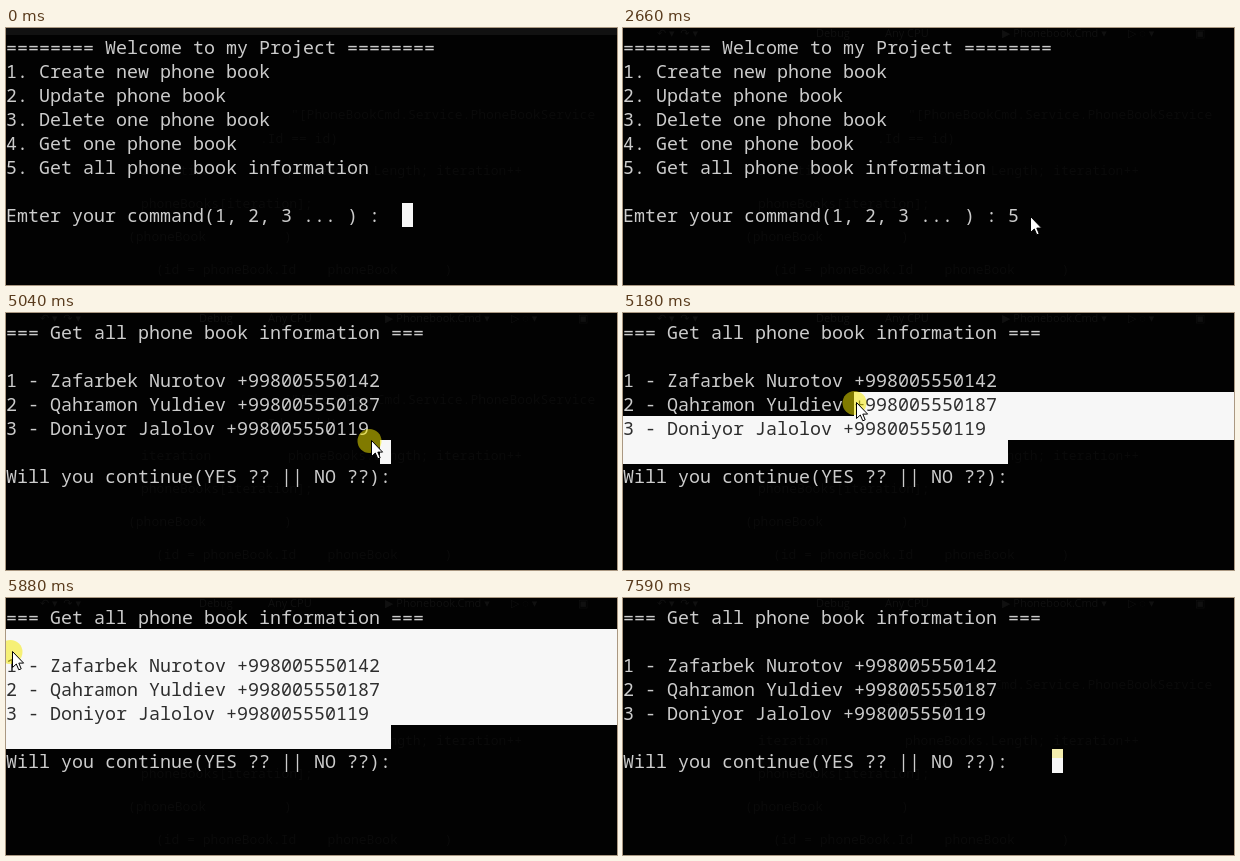
An HTML page for the animation above (8 s loop, 611 by 257 pixels).

```html
<!DOCTYPE html>
<html lang="en">
<head>
<meta charset="utf-8">
<title>Phone book console</title>
<style>
  html, body { margin: 0; width: 100%; height: 100%; overflow: hidden; background: #020202; }
  #stage { position: absolute; left: 0; top: 0; width: 611px; height: 257px; overflow: hidden; background: #020202; isolation: isolate; }
  pre {
    position: absolute; left: 0; top: 7px; margin: 0;
    font: 18.333px/24px "Noto Sans Mono", "DejaVu Sans Mono", monospace;
    font-variant-ligatures: none; color: #ccc;
  }
  svg { position: absolute; left: 0; top: 0; }
  #marks { mix-blend-mode: difference; }
  #ghost text { font: 13px "Noto Sans Mono", monospace; fill: #fff; fill-opacity: .035; white-space: pre; }
  #ghost #bar text { font: 11px "Open Sans", sans-serif; fill-opacity: .06; }
</style>
</head>
<body>
<div id="stage">
  <pre id="menu">======== Welcome to my Project ========
1. Create new phone book
2. Update phone book
3. Delete one phone book
4. Get one phone book
5. Get all phone book information

Emter your command(1, 2, 3 ... ) : <span id="typed">5</span></pre>
  <pre id="list">=== Get all phone book information ===

1 - Zafarbek Nurotov +998005550142
2 - Qahramon Yuldiev +998005550187
3 - Doniyor Jalolov +998005550119

Will you continue(YES ?? || NO ??):</pre>

  <svg id="marks" width="611" height="257">
    <path id="sel" fill="#f9f9f9"/>
  </svg>

  <svg id="ghost" width="611" height="257">
    <rect id="strip" width="611" height="7" fill="#fff" fill-opacity=".06"/>
    <g id="bar">
      <text x="34" y="9">↶ ▾  ↷ ▾</text>
      <text x="193" y="9">Debug</text>
      <text x="262" y="9">Any CPU</text>
      <text x="379" y="9">▶ Phonebook.Cmd ▾</text>
      <text x="505" y="9">▷ ◌ ▾</text>
      <text x="572" y="9">▣</text>
    </g>
    <text x="285" y="91">"[PhoneBookCmd.Service.PhoneBookService</text>
    <text x="254" y="115">.Id == id)</text>
    <text x="135" y="147">iteration</text>
    <text x="282" y="147">phoneBooks.Length; iteration++</text>
    <text x="135" y="180">phoneBooks[iteration];</text>
    <text x="122" y="213">(phoneBook          )</text>
    <text x="150" y="246">(id = phoneBook.Id    phoneBook      )</text>
  </svg>

  <svg width="611" height="257">
    <rect id="tint" x="429" y="151" width="11" height="9" fill="#f4eeae"/>
    <rect id="caret" width="11" height="6" fill="#f9f9f9"/>
    <g id="mouse">
      <circle id="press" cx="-1.5" cy="1" r="12" fill="#f5ea00" fill-opacity=".52"/>
      <path d="M.5 .5V16.5L4.3 13L6.8 18.8L9.2 17.8L6.8 12.1H11.6Z" fill="#fff" stroke="#000"/>
    </g>
  </svg>
</div>

<script>
const LOOP = 8000, CW = 11, RH = 24, TOP = 7, STEP = 70, BLINK = 535;
const CLEAR = 860, TYPE = 2530, ENTER = 3060, LIST = 3130;
const PRESS = 4970, DRAG = 5110, RELEASE = 6030, CLICK = 6970;
const $ = id => document.getElementById(id);
const show = (id, on) => { $(id).style.display = on ? '' : 'none'; };
const ease = k => k * k * (3 - 2 * k);

// pointer moves: start time, number of steps, end point
const home = [466, 260];
const moves = [
  [390, 2, 441, 199], [790, 6, 399, 180], [2130, 3, 407, 188],
  [3730, 6, 426, 184], [4150, 5, 411, 142], [4830, 3, 365, 127],
  [5040, 4, 100, 50], [5320, 4, 10, 45], [5670, 5, 4, 57],
  [6290, 8, 435, 172], [7240, 5, 434, 260]
];

function pointer(t) {
  let [x, y] = home;
  for (const [start, steps, toX, toY] of moves) {
    if (t < start) break;
    const k = ease(Math.min(1, Math.floor((t - start) / STEP) / steps));
    x += (toX - x) * k;
    y += (toY - y) * k;
  }
  return [Math.round(x), Math.round(y)];
}

// outline of the cells from (c, r) to (c2, r2), in reading order
function cells(c, r, c2 = c, r2 = r) {
  const x = c * CW, y = TOP + r * RH, x2 = (c2 + 1) * CW, y2 = TOP + r2 * RH;
  return r === r2
    ? `M${x} ${y}H${x2}V${y + RH}H${x}Z`
    : `M${x} ${y}H611V${y2}H${x2}V${y2 + RH}H0V${y + RH}H${x}Z`;
}

function selection(t) {
  if (t < CLEAR) return cells(36, 7);
  if (t < PRESS) return '';
  if (t < DRAG) return cells(34, 5);
  if (t >= CLICK) return cells(39, 6);
  const [x, y] = pointer(Math.min(t, RELEASE));
  return cells(Math.floor(x / CW), Math.floor((y - TOP) / RH), 34, 5);
}

function caretCell(t) {
  if (t < TYPE) return [35, 7];
  if (t < ENTER) return [36, 7];
  return t < LIST ? [0, 8] : [36, 6];
}

function draw(t) {
  show('menu', t < LIST);
  show('list', t >= LIST);
  show('typed', t >= TYPE);
  show('strip', t < CLEAR);
  show('bar', t >= CLEAR);
  show('tint', t >= CLICK);
  $('sel').setAttribute('d', selection(t));

  const lit = Math.floor((t + 20) / BLINK) % 2 === 0;
  const [col, row] = caretCell(t);
  show('caret', t >= CLEAR && t < CLICK && (lit || row === 8));
  $('caret').setAttribute('x', col * CW);
  $('caret').setAttribute('y', TOP + (row + 1) * RH - 6);

  show('press', t >= PRESS && t < RELEASE || t >= CLICK && t < CLICK + STEP);
  $('mouse').setAttribute('transform', `translate(${pointer(t)})`);
}

const begin = performance.now();
function tick() {
  draw((performance.now() - begin) % LOOP);
  requestAnimationFrame(tick);
}
tick();
</script>
</body>
</html>
```
